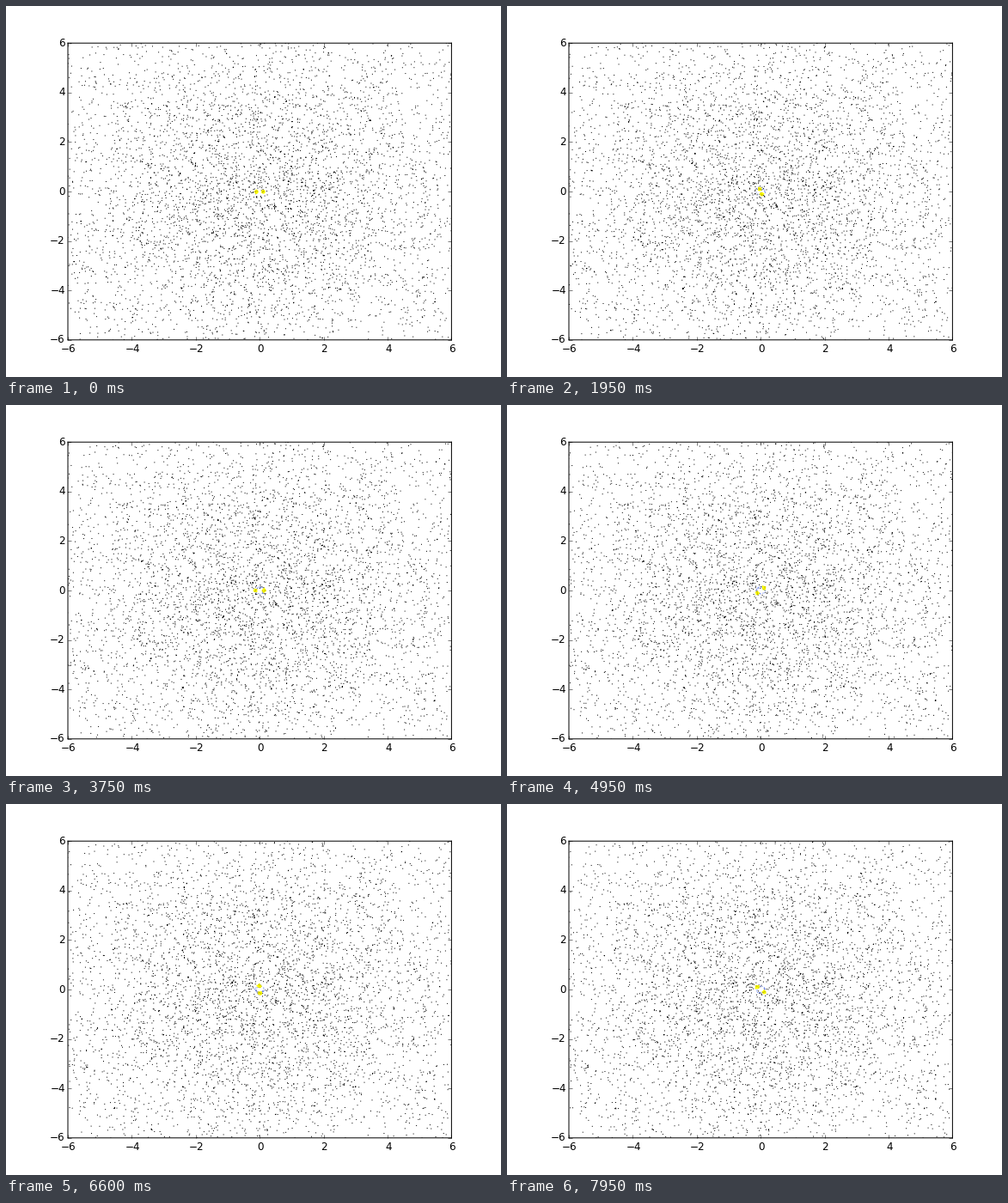
Animation of 576x432 px, one loop 8000 ms. Source, as a matplotlib script:

```python
import numpy as np
import matplotlib.pyplot as plt
from matplotlib.animation import FuncAnimation
from matplotlib.patches import PathPatch
from matplotlib.path import Path
from matplotlib.transforms import ScaledTranslation

plt.style.use("classic")
plt.rcParams["font.family"] = "DejaVu Sans"
plt.rcParams["path.snap"] = False

INTERVAL = 50
FRAMES = 160
HOLD = 3                # ticks per simulation step
LIMIT = 6
PIXEL = np.array([12 / 446.4, 12 / 345.6])    # one pixel in data units

rng = np.random.default_rng(7)

# Field stars: a broad core on a thin uniform background
field = np.vstack([rng.normal(0, 3.3, (4100, 2)),
                   rng.uniform(-6.2, 6.2, (1400, 2))])
field_r = np.hypot(*field.T)
field_angle = np.arctan2(field[:, 1], field[:, 0])
field_omega = 0.003 / np.maximum(field_r, 0.25) ** 1.5
drift = rng.normal(0, 0.0014, field.shape)

# Two compact clusters circling each other, shedding a faint ring
clump = rng.normal(0, 1, (2, 16, 2))
ring_phase = rng.uniform(0, 2 * np.pi, 26)
ring_r = rng.normal(0.13, 0.014, 26)

KEY_STEPS = [0, 13, 25, 33, 39, 48, 53]
KEY_ANGLES = np.radians([0, 107, 180, 224, 253, 292, 316])


def polar(r, angle):
    return np.column_stack([r * np.cos(angle), r * np.sin(angle)])


def dots(points, size=1.0):
    """One path holding a small square at every point."""
    corners = np.array([[-1, -1], [1, -1], [1, 1], [-1, 1], [-1, -1]])
    square = corners * PIXEL * size / 2
    codes = [Path.MOVETO] + [Path.LINETO] * 3 + [Path.CLOSEPOLY]
    return Path((points[:, None] + square).reshape(-1, 2),
                np.tile(codes, len(points)))


def field_at(step):
    return polar(field_r, field_angle + field_omega * step) + drift * step


def clusters_at(step):
    angle = np.interp(step, KEY_STEPS, KEY_ANGLES)
    radius = np.interp(step, [0, 13, 33], [0.11, 0.11, 0.15])
    spread = np.interp(step, [0, 25], [0.75, 1])
    centers = polar(radius, angle + np.array([0, np.pi]))
    turn = np.array([[np.cos(angle), np.sin(angle)],
                     [-np.sin(angle), np.cos(angle)]])
    return centers, centers[:, None] + clump @ turn * spread * PIXEL


def dot_layer(color, size=1.0):
    patch = PathPatch(dots(np.zeros((1, 2)), size), fc=color, lw=0, ec="none")
    return ax.add_patch(patch)


fig = plt.figure(figsize=(8, 6), dpi=72, facecolor="white")
ax = fig.add_axes([0.125, 0.1, 0.775, 0.8])
ax.set_xlim(-LIMIT, LIMIT)
ax.set_ylim(-LIMIT, LIMIT)

nudge = ScaledTranslation(0.8 / 72, 0, fig.dpi_scale_trans)
for label in ax.get_xticklabels() + ax.get_yticklabels():
    label.set_transform(label.get_transform() + nudge)

stars = dot_layer("black")
ring = dot_layer("#7088e8")
cores, = ax.plot([], [], "o", color="yellow", ms=4.2, mew=0)
members = dot_layer("yellow")
specks = dot_layer("#b8b000")
for z, layer in enumerate((stars, ring, cores, members, specks)):
    layer.set_zorder(2 + z / 10)


def draw(frame):
    step = frame // HOLD
    stars.set_path(dots(field_at(step)))

    centers, swarm = clusters_at(step)
    cores.set_data(*centers.T)
    cores.set_markersize(np.interp(step, [0, 25], [4.4, 3.4]))
    members.set_path(dots(swarm.reshape(-1, 2), 1.6))
    specks.set_path(dots(swarm[:, :4].reshape(-1, 2)))

    shed = min(step, len(ring_phase))
    ring.set_visible(shed > 0)
    if shed:
        trail = polar(ring_r, ring_phase + 0.11 * step)[:shed]
        ring.set_path(dots(trail))
    return stars, ring, cores, members, specks


anim = FuncAnimation(fig, draw, frames=FRAMES, interval=INTERVAL,
                     repeat=True, repeat_delay=0, blit=False)
plt.show()
```
